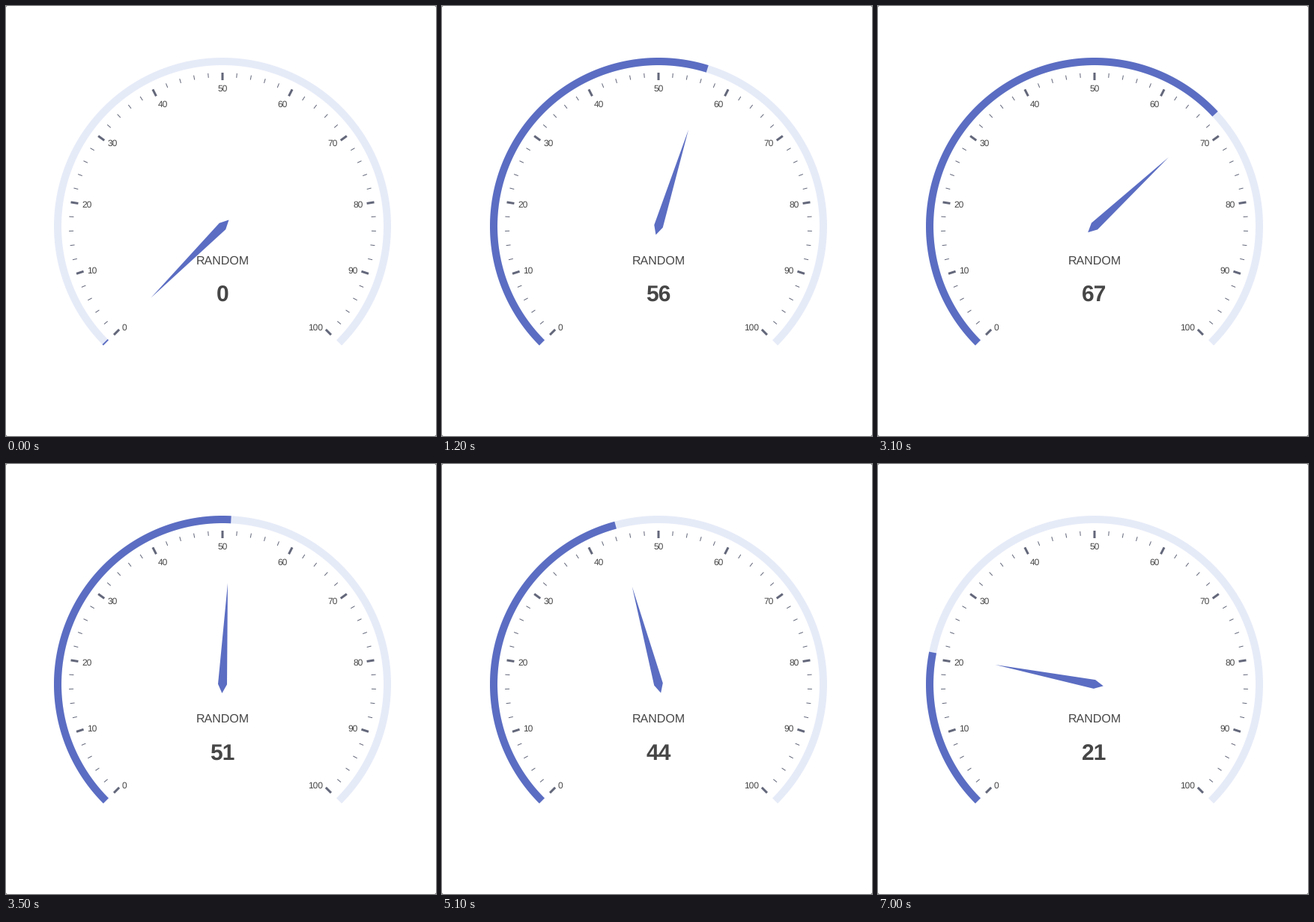
Animation, 574 px wide and 574 px high, one loop 7100 ms. Source, as a matplotlib script:

```python
import numpy as np
import matplotlib.pyplot as plt
from matplotlib.animation import FuncAnimation
from matplotlib.patches import Polygon

SIZE, DPI = 574, 100
FRAMES, STEP = 71, 100
CX, CY, R = 289, 294, 225
BAND = 10
BLUE, TRACK, TICK, INK = "#5b6dc2", "#e6ebf8", "#63677a", "#464646"

# start ms, duration ms, value reached
MOVES = [
    (0, 500, 66), (985, 530, 30), (1985, 500, 69), (2960, 500, 51.1),
    (3500, 800, 65.4), (4500, 800, 43), (5500, 800, 66), (6500, 800, 8.7),
]

plt.rcParams["font.family"] = "Liberation Sans"
plt.rcParams["text.hinting"] = "none"
plt.rcParams["path.snap"] = False


def ease(t):
    """Cubic in-out."""
    t = min(max(t, 0), 1)
    return 4 * t ** 3 if t < 0.5 else 1 - 4 * (1 - t) ** 3


def value_at(ms):
    v = 0
    for start, length, goal in MOVES:
        v += (goal - v) * ease((ms - start) / length)
    return v


def direction(v):
    a = np.radians((np.asarray(v) - 50) * 2.7)
    return np.array([np.sin(a), -np.cos(a)])


def point(r, v):
    return np.array([CX, CY]) + r * direction(v).T


def band(v):
    vs = np.linspace(0, v, 240)
    return np.vstack([point(R, vs), point(R - BAND, vs[::-1])])


def needle(v):
    ux, uy = direction(v)
    side = 6 * np.array([-uy, ux])
    mid = np.array([CX, CY])
    return [point(-12, v), mid + side, point(135, v), mid - side]


def shape(points, color, z):
    return ax.add_patch(Polygon(points, closed=True, fc=color, lw=0, zorder=z))


def label(x, y, text, px, ha="center", weight="normal"):
    return ax.text(x, y + 0.355 * px, text, fontsize=px * 72 / DPI, color=INK,
                   ha=ha, va="baseline", weight=weight, zorder=5)


def tick(v, length, width):
    (x0, y0), (x1, y1) = point(205, v), point(205 - length, v)
    ax.plot([x0, x1], [y0, y1], color=TICK, lw=width * 72 / DPI,
            solid_capstyle="butt", snap=False, zorder=3)


fig = plt.figure(figsize=(SIZE / DPI, SIZE / DPI), dpi=DPI, facecolor="white")
ax = fig.add_axes([0, 0, 1, 1])
ax.set_xlim(0, SIZE)
ax.set_ylim(SIZE, 0)
ax.axis("off")

# tiny grey window corners
for x, sx in ((0, 1), (SIZE, -1)):
    for y, sy in ((0, 1), (SIZE, -1)):
        shape([(x, y), (x + 1.6 * sx, y), (x, y + 1.6 * sy)], "#808080", 1)

shape(band(100), TRACK, 1)

for v in range(0, 101, 2):
    if v % 10:
        tick(v, 6, 1)
        continue
    tick(v, 10, 3)
    ux, uy = direction(v)
    x, y = point(190, v)
    ha = "left" if ux < -0.4 else "right" if ux > 0.4 else "center"
    label(x, y + (6 if uy < -0.8 else 0), str(v), 12, ha)

progress = shape(band(0.18), BLUE, 2)
pointer = shape(needle(0), BLUE, 4)
label(CX, CY + 0.2 * R, "RANDOM", 16)
detail = label(CX, CY + 0.4 * R, "0", 30, weight="bold")


def draw(i):
    v = value_at(i * STEP)
    progress.set_xy(band(max(v, 0.18)))
    pointer.set_xy(needle(v))
    detail.set_text(str(round(v)))
    return progress, pointer, detail


anim = FuncAnimation(fig, draw, frames=FRAMES, interval=STEP,
                     repeat=True, repeat_delay=0, blit=False)
plt.show()
```
